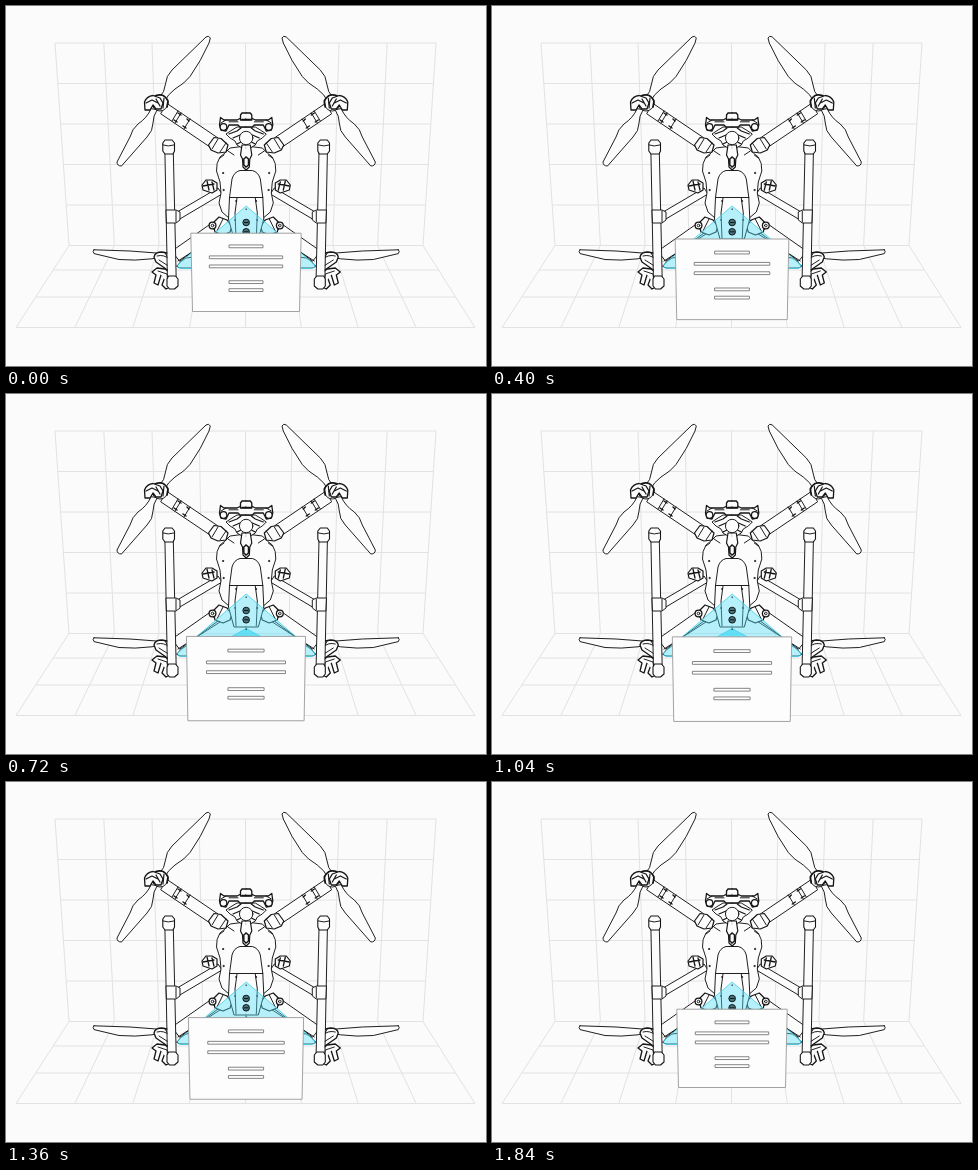
Animation, 480 px wide and 360 px high, one loop 2000 ms. Source, as an HTML page:

```html
<!DOCTYPE html>
<html lang="en">
<head>
<meta charset="utf-8">
<title>Drone calibration</title>
<style>
html, body { margin: 0; width: 100%; height: 100%; overflow: hidden; background: #fbfbfb; }
svg { display: block; width: 100vw; height: 100vh; }
</style>
</head>
<body>
<svg viewBox="0 0 480 360">
  <path id="grid" fill="none" stroke="#e2e2e2"/>

  <g fill="#fcfcfc" stroke="#151515" stroke-width=".95" stroke-linejoin="round" stroke-linecap="round">
    <g id="half">
      <!-- rear rotor and arm -->
      <path d="M88 243.800L124 245 157 247.500 156 250.500 146 252.800Q129 255 113 253.500L88 247.600Q86 245 88 243.800Z"/>
      <path d="M171 260Q174 255 180 252L196 250V262H175Q171 262 171 260Z"/>
      <path d="M166 245L203 219 212 227 174 255Z"/>
      <path d="M172 255L214 228"/>
      <path stroke-width="1.300" d="M148 251Q149 246 156 246L166 248 167 266 160 263 150 256Z"/>
      <path d="M151 250Q158 248 163 253M153 254L164 261M159 247L162 252"/>
      <path stroke-width="1.300" d="M146 266L151 262 159 263 166 268 166 280 160 283 156 279 159 271 155 269 152 279 148 277 150 269Z"/>
      <path d="M152 265L161 268 163 279"/>
      <path stroke-width="1.200" d="M207 217L213 211 221 214 226 220 224 226 217 229 209 226Z"/>
      <path d="M211 225L217 213"/>
      <circle cx="206.500" cy="219.500" r="3.400" stroke-width="1.300"/>
      <circle cx="206.500" cy="219.500" r="1.300"/>
      <!-- side strut -->
      <path d="M172 205.500L212 182 216 188 173 213.500Z"/>
      <path stroke-width="1.200" d="M196 179L200 174H206L211 177V184L206 187 197 184Z"/>
      <path stroke-width="1.300" d="M197 180L208 178M201 175L203 184M206 176L208 184"/>
      <!-- hull -->
      <path d="M240.150 140L224 142 219 147 214 151Q210 157 210.500 165L214 176 215 187 213 197 216 206 223 212 228 232H240.150"/>
      <path d="M222 145L228 149M214 152L218 149" fill="none"/>
      <circle cx="217" cy="167" r=".6"/>
      <circle cx="217.500" cy="184" r=".6"/>
      <!-- front arm -->
      <path d="M161 97.500L212 132 204 141 155 108Z"/>
      <path d="M172 105L166 115M175 107L169 117M184 113L178 123" fill="none"/>
      <path stroke-width="1.400" d="M172 107L175 109M168 114L171 116M181 113L183 115M177 120L180 122"/>
      <path stroke-width="1.200" d="M202.500 139L208 131.500 215 132.500 222 139 220 146 212 147 205 144Z"/>
      <path d="M206 143L212 133M214 146L220 137" fill="none"/>
      <!-- front rotor -->
      <path d="M153 92Q159 86 159.500 78Q160 70 166 64L200 31Q203 29 204.300 32L203 37Q195 55 184 70.500Q179 77 169 83Q162 88 158 96Z"/>
      <path d="M145 103Q141 112 132 118Q126 123 124 131L111 156Q111 160 115.500 160L141 131Q147 125 147 117Q147 110 151 104Z"/>
      <circle cx="154" cy="97" r="8"/>
      <path stroke-width="1.700" d="M147 91Q157 85 162 95L161 101" fill="none"/>
      <path stroke-width="1.300" d="M139 104L138.500 96Q141 90 147 89.500L154 92 157 97 155 103 150 103 147 99 144 104Z"/>
      <path stroke-width="1.200" d="M140 97L146 94 152 97M150 93L154 100M158 92L157 102" fill="none"/>
      <!-- landing leg -->
      <path d="M159.300 146H167.300L170.200 273H161.800Z"/>
      <path stroke-width="1.100" d="M159 134H166L168.500 137V145L167 148H159L156.800 145V137Z"/>
      <path d="M157 139Q162 141 168 139" fill="none"/>
      <path d="M160.300 204H170L174 206V214L170 217H160.800Z"/>
      <path d="M170 205V216" fill="none"/>
      <path stroke-width="1.100" d="M162.500 270H169.500L172 273V280L168.500 283H163.500L161 280V273Z"/>
      <!-- gimbal -->
      <path d="M240.150 121H231L226 124 220 128 224 132 229 135 231 139 236 142H240.150"/>
      <path stroke-width="1.200" d="M223 128L231 125 235 122M227 132L234 129M231 138L235 136" fill="none"/>
      <path stroke-width="1.300" d="M240.150 112.500H234L231 114H218L214.500 111.500 213.500 119 215 124 220 125 223 119 232 119 234 121H240.150"/>
      <circle cx="217.500" cy="121" r="3.300" stroke-width="1.200"/>
      <path d="M215 117L220 114M223 115.800H232" fill="none"/>
      <path stroke-width="1.300" d="M240.150 107H236L234.500 109V114H240.150"/>
      <path stroke-width="1.200" d="M240.150 139H236L234.500 149 236.500 153 237 161 240.150 164"/>
      <path stroke-width="1.500" d="M240.150 151L237.800 153V159L240.150 161"/>
      <!-- battery and camera plate -->
      <path d="M240.150 164.500H234Q228 166 226 173L223.500 191.500 222.500 213 228 233H240.150"/>
      <path d="M240.150 191.500H223.500M231 192L229 207 230 232" fill="none"/>
      <circle cx="230" cy="195" r=".5"/>
      <circle cx="229" cy="214" r=".5"/>
    </g>
    <use href="#half" transform="translate(480.300) scale(-1 1)"/>
    <circle cx="240.150" cy="132" r="6.700"/>
    <path d="M236 113.500H245" stroke-width="1.300"/>
  </g>

  <g stroke="#3fd2ec" stroke-width=".8" stroke-linejoin="round">
    <path fill="#55e0f7" fill-opacity=".42" d="M240.150 200L309 259Q309 262.500 305 262.500H175.500Q171.500 262.500 171.500 259Z"/>
    <path fill="#2fd6f6" fill-opacity=".6" d="M240.150 234.500L272 252H208.500Z"/>
  </g>
  <g fill="#45757f" stroke="#151515">
    <circle cx="240.150" cy="216.500" r="3.300"/>
    <circle cx="240.150" cy="225.800" r="3.300"/>
    <path d="M238 216.500H242.500M238 225.800H242.500M240.150 202.500V204M240.150 234.500V236"/>
  </g>

  <path id="card" fill="#fdfdfd" stroke="#999" stroke-width=".9"/>
  <path id="bars" fill="#fff" stroke="#777" stroke-width=".9"/>
</svg>
<script>
const LOOP = 2000, HOLD = 240, STEP = 160, CX = 240;
const el = id => document.getElementById(id);
const mix = (a, b, t) => a + (b - a) * t;

function drawGrid() {
  let d = "";
  const line = (...p) => { d += `M${p[0]} ${p[1]}L${p.slice(2).join(" ")}`; };
  for (let i = 0; i <= 8; i++) {
    // columns narrow a little towards the middle
    const u = i / 8 + .0045 * Math.sin(Math.PI * i / 4);
    line(mix(49, 430, u), 37, mix(63, 417, u), 239.5, mix(10, 469, u), 321.5);
  }
  for (let i = 0; i <= 5; i++) {
    const u = i / 5, y = mix(37, 239.5, u);
    line(mix(49, 63, u), y, mix(430, 417, u), y);
  }
  for (const y of [264, 291, 321.5]) {
    const u = (y - 239.5) / 82;
    line(mix(63, 10, u), y, mix(417, 469, u), y);
  }
  el("grid").setAttribute("d", d);
}

// Each bar: position down the card, half width far and near
const BARS = [[.168, 17, 18.2], [.308, 36.7, 39.8], [.424, 36.7, 39.8], [.625, 17, 18.2], [.727, 17, 18.2]];

function draw(ms) {
  const t = ms % LOOP;
  const k = t < HOLD ? 0 : 1 + Math.floor((t - HOLD) / STEP);
  // five steps towards the viewer, six steps back
  const turn = k <= 5 ? k / 5 : 1 + (k - 5) / 6;
  const p = (1 - Math.cos(Math.PI * turn)) / 2;

  const top = mix(227.2, 244, p), bottom = mix(305.5, 329, p);
  const wTop = mix(55.2, 60, p), wBottom = mix(53.5, 58.6, p);
  el("card").setAttribute("d",
    `M${CX - wTop} ${top}H${CX + wTop}L${CX + wBottom} ${bottom}H${CX - wBottom}Z`);

  el("bars").setAttribute("d", BARS.map(([v, far, near]) => {
    const w = mix(far, near, p), y = mix(top, bottom, v);
    return `M${CX - w} ${y - 1.4}h${2 * w}v2.8h${-2 * w}Z`;
  }).join(""));
}

drawGrid();
const start = performance.now();
function tick() {
  draw(performance.now() - start);
  requestAnimationFrame(tick);
}
tick();
</script>
</body>
</html>
```
